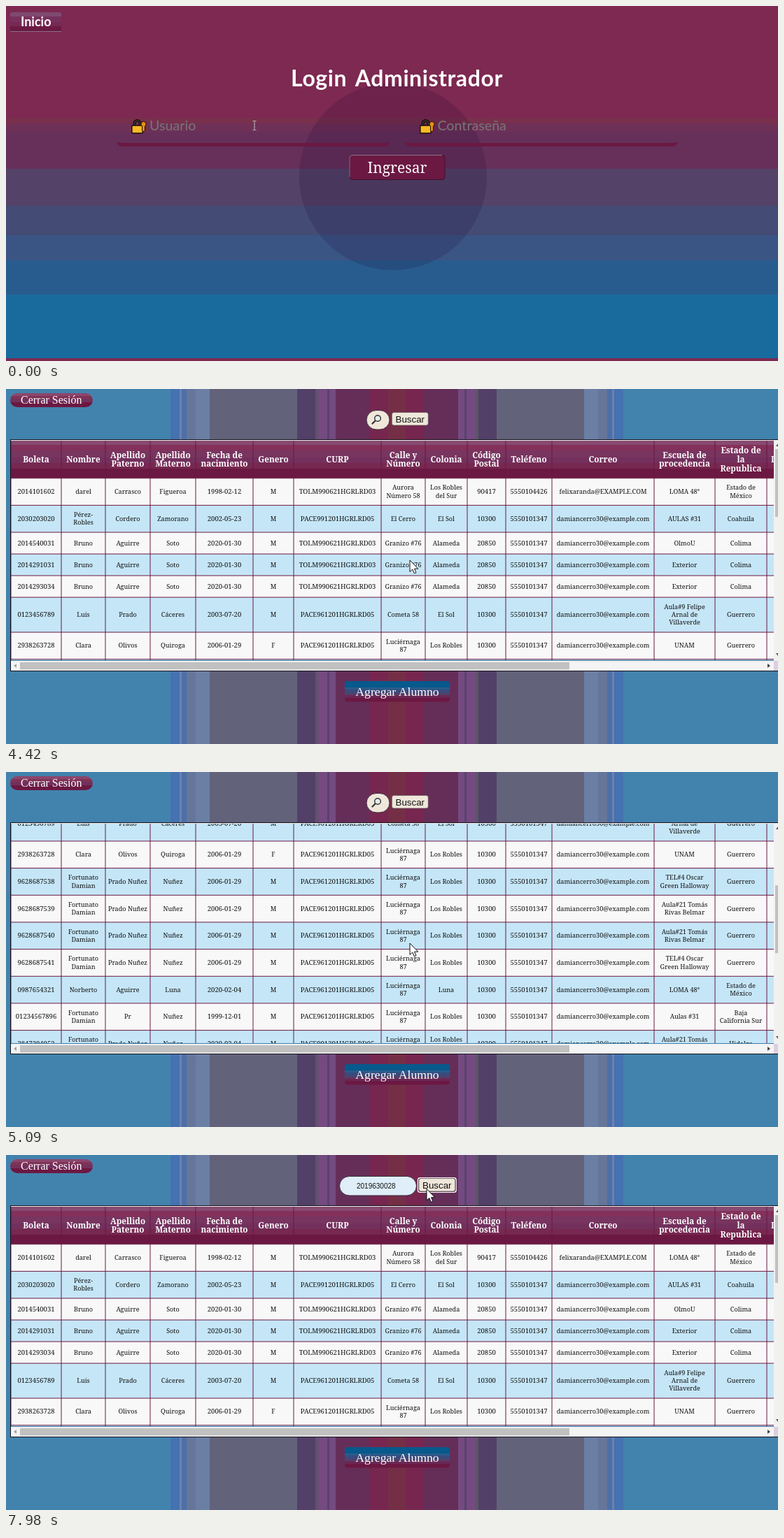
An HTML page that plays this animation: 1103x508 px, repeating every 8000 ms.

```html
<!DOCTYPE html>
<html lang="es">
<head>
<meta charset="utf-8">
<title>Login</title>
<style>
html, body { margin: 0; width: 100%; height: 100%; overflow: hidden; }
svg { display: block; width: 100vw; height: 100vh; }
text { white-space: pre; }
.mid { text-anchor: middle; }
.title { font: bold 32px Lato, sans-serif; letter-spacing: .58px; word-spacing: 4.4px; fill: #fff; }
.hint { font: 500 19.6px Lato, sans-serif; fill: #777274; }
.user { font: 500 20px Lato, sans-serif; fill: #000; }
.home { font: bold 18px Lato, sans-serif; fill: #fff; }
.enter { font: 500 21px "Noto Serif", serif; fill: #fff; }
.out { font: 16px "Liberation Serif", serif; fill: #fff; }
.add { font: 17.7px "Liberation Serif", serif; fill: #fff; }
.find { font: 13.33px "Liberation Sans", sans-serif; fill: #111; }
.query { font: 10px "Liberation Sans", sans-serif; fill: #111; }
.item { font: 600 10px "Noto Sans", sans-serif; fill: #f0f0ec; }
.head { font: bold 11.7px "Noto Serif", serif; fill: #fff; }
.cell { font: 9.1px "Noto Serif", serif; fill: #111; }
.num { font-size: 9.5px; }
</style>
</head>
<body>
<svg id="stage" viewBox="0 0 1103 508" preserveAspectRatio="none"></svg>
<script>
const LOOP = 8000;
const WINE = '#6b1842';
const CREAM = '#efe7da';

const rect = (x, y, w, h, fill, more = '') =>
  `<rect x="${x}" y="${y}" width="${w}" height="${h}" fill="${fill}" ${more}/>`;
const text = (x, y, s, cls) => `<text x="${x}" y="${y}" class="${cls}">${s}</text>`;
const path = (d, more) => `<path d="${d}" ${more}/>`;
const group = (id, body, more = '') => `<g id="${id}" ${more}>${body}</g>`;

// Vertical gradient with hard edges: pairs of start offset and colour.
const bands = (id, stops) => `<linearGradient id="${id}" x2="0" y2="1">` +
  stops.map(([at, c], i) => {
    const end = i + 1 < stops.length ? stops[i + 1][0] : 1;
    return `<stop offset="${at}" stop-color="${c}"/><stop offset="${end}" stop-color="${c}"/>`;
  }).join('') + '</linearGradient>';

const ring = (id, x, y, w, h) => group(id,
  rect(x + .75, y + .75, w - 1.5, h - 1.5, 'none', 'stroke="#fff" stroke-width="1.5" rx="3"') +
  rect(x + 2.25, y + 2.25, w - 4.5, h - 4.5, 'none', 'stroke="#141014" stroke-width="1.5" rx="2"'));

const lock = x => `<g transform="translate(${x} 162)" stroke="#181008" stroke-width="1.5">` +
  path('M4.5 10V6a4 4 0 0 1 8 0v4', 'fill="none" stroke-width="4"') +
  path('M4.5 10V6a4 4 0 0 1 8 0v4', 'fill="none" stroke="#4c4a4c" stroke-width="1"') +
  rect(.8, 9, 15.5, 11, '#fcb925', 'rx="1.5"') +
  path('M15.5 10a3.6 3.6 0 1 1 4 0v6l-2 2-2-2z', 'fill="#e88d12" stroke-width="1"') + '</g>';

/* ---------- Login page ---------- */

const stripes = [[0, '#7d2951'], [160, '#79304c'], [168, '#6f3057'], [180, '#66305b'], [233, '#544268'],
  [286, '#444b75'], [328, '#3a5484'], [364, '#295c8e'], [413, '#196b9e'], [504, '#7d2951']];
const underline = x => path(`M${x} 195q8 1 14 1h362q8 0 14-1q-2 6-9 6h-372q-7 0-9-6z`, `fill="${WINE}"`);

function dropdown(id, x, y, w, items) {
  return group(id,
    rect(x - 1, y, w + 2, 192, '#000', 'opacity=".18" rx="4"') +
    rect(x, y, w, 190, '#232921', 'rx="3"') +
    rect(x, 0, w, 29.5, '#51513f', `id="${id}Hover"`) +
    items.map((s, i) => text(x + 10, y + 25 + i * 29.5, s, 'item')).join(''));
}

const users = ['tutor', 'tutor02', 'control', 'revisor', 'consulta', 'prueba'];
const found = ['PE2948264826', 'PE87654321', '2019630028', 'PE12345678', '2019630021', '2839203330'];

const login =
  stripes.map(([y, c], i) => rect(0, y, 1103, (i < stripes.length - 1 ? stripes[i + 1][0] : 508) - y, c)).join('') +
  '<circle cx="553" cy="244" r="134" fill="#14062c" opacity=".16"/>' +
  rect(6, 9, 73, 28, 'url(#home)', 'rx="3"') + rect(6, 36, 73, 1, '#8b6f86') +
  text(21, 29, 'Inicio', 'home') +
  text(558.5, 115, 'Login Administrador', 'title mid') +
  underline(158) + underline(570) +
  group('userHint', lock(179) + text(205, 178, 'Usuario', 'hint')) +
  text(176, 178, users[0], 'user" id="userText') +
  group('passHint', lock(591) + text(616.5, 178, 'Contraseña', 'hint')) +
  group('dots', Array.from({ length: 11 }, (_, i) => `<circle cx="${594 + i * 10.7}" cy="173" r="4.3"/>`).join('')) +
  rect(491, 213.5, 136, 35, WINE, 'rx="4" stroke="#3c1230"') +
  path('M491 245V217q0-3.5 4-3.5H623', 'fill="none" stroke="#8c7488"') +
  text(559, 239, 'Ingresar', 'enter mid') +
  ring('userRing', 156, 145, 394, 58) + ring('passRing', 568, 145, 394, 58) + ring('enterRing', 488, 211, 142, 40) +
  dropdown('userList', 157, 203, 392, users);

/* ---------- Table page ---------- */

const cols = [7, 79, 142, 206, 271, 353, 411, 536, 599, 659, 714, 780, 926, 1013, 1087];
const heads = ['Boleta', 'Nombre', 'Apellido/Paterno', 'Apellido/Materno', 'Fecha de/nacimiento', 'Genero', 'CURP',
  'Calle y/Número', 'Colonia', 'Código/Postal', 'Teléfeno', 'Correo', 'Escuela de/procedencia', 'Estado de/la/Republica'];

const TEL = '5550101347';
const MAIL = `${TEL}|damiancerro30@example.com`;
const AULA = 'Aula#21 Tomás/Rivas Belmar';
const TECH = 'TEL#4 Oscar/Green Halloway';
const MAN = 'Fortunato/Damian|';
const STREET = 'Luciérnaga/87';
const CODE = 'PACE991201HGRLRD05', CODE2 = 'PACE961201HGRLRD05', CODE3 = 'TOLM990621HGRLRD03';
const bruno = (id, school) => `${id}|Bruno|Aguirre|Soto|2020-01-30|M|${CODE3}|Granizo #76|Alameda|20850|${MAIL}|${school}|Colima`;
const damian = id => `${id}|${MAN}Prado Nuñez|Nuñez|2020-02-04|M|${CODE}|${STREET}|Los Robles/del Sur|10300|${MAIL}|${AULA}|Hidalgo`;
const early = (id, school) => `${id}|${MAN}Prado Nuñez|Nuñez|2006-01-29|M|${CODE2}|${STREET}|Los Robles|10300|${MAIL}|${school}|Guerrero`;

const rows = [
  `2014101602|darel|Carrasco|Figueroa|1998-02-12|M|${CODE3}|Aurora/Número 58|Los Robles/del Sur|90417|5550104426|felixaranda@EXAMPLE.COM|LOMA 48°|Estado de/México`,
  `2030203020|Pérez-/Robles|Cordero|Zamorano|2002-05-23|M|${CODE}|El Cerro|El Sol|10300|${MAIL}|AULAS #31|Coahuila`,
  bruno('2014540031', 'OlmoU'), bruno('2014291031', 'Exterior'), bruno('2014293034', 'Exterior'),
  `0123456789|Luis|Prado|Cáceres|2003-07-20|M|${CODE2}|Cometa 58|El Sol|10300|${MAIL}|Aula#9 Felipe/Arnal de/Villaverde|Guerrero`,
  `2938263728|Clara|Olivos|Quiroga|2006-01-29|F|${CODE2}|${STREET}|Los Robles|10300|${MAIL}|UNAM|Guerrero`,
  early('9628687538', TECH), early('9628687539', AULA), early('9628687540', AULA), early('9628687541', TECH),
  `0987654321|Norberto|Aguirre|Luna|2020-02-04|M|${CODE2}|${STREET}|Luna|10300|${MAIL}|LOMA 48°|Estado de/México`,
  `01234567896|${MAN}Pr|Nuñez|1999-12-01|M|${CODE2}|${STREET}|Los Robles|10300|${MAIL}|Aulas #31|Baja/California Sur`,
  ...['3847294053', '1937462930', '2039462937', '1204939382'].map(damian),
  `3847294829|Eva|Campos|Figueroa|1995-04-10|F|CAFE950410HGRLRD01|Aurora/Número 58|Leonardo|71260|5550102285|claraNsol.4@example.com|Aula#5/Aurelio/Montes Rey|Oaxaca`,
  `2019630028|${MAN}Prado|Nuñez|1999-12-01|M|${CODE}|Fausto/Lira|Los Robles|83100|${MAIL}|LOMA 48°|Guerrero`,
  `7394947193|Luis|Pérez|Robles|1999-06-23|M|PERL990621HGRLRD03|Laguna 87|Olmeda|10300|5550108583|lperez@example.com|${TECH}|Colima`,
  ...['2839203330', '2019630021', '2948264826'].map(damian)
];

const isNum = c => [0, 4, 6, 9, 10].includes(c);
const lines = (s, x, y, step, cls) => {
  const all = s.split('/');
  return all.map((l, i) => text(x, y + (i - (all.length - 1) / 2) * step, l, cls)).join('');
};
const middle = c => (cols[c] + cols[c + 1]) / 2;

function table() {
  let out = rect(7, 74, 1090, 53.5, 'url(#head)');
  heads.forEach((h, c) => out += lines(h, middle(c), 105, 12.7, 'head mid'));
  out += text(1093, 105, 'I', 'head');
  let y = 127.7;
  rows.forEach((row, r) => {
    const cells = row.split('|');
    const n = Math.max(...cells.map(s => s.split('/').length));
    const h = [31, 38.67, 50][n - 1];
    out += rect(7, y, 1090, h, r % 2 ? '#c5e6f7' : '#f8f8f8') + rect(7, y - .5, 1090, 1, WINE);
    cells.forEach((s, c) => out += lines(s, middle(c), y + h / 2 + 3, 11.3, 'cell mid' + (isNum(c) ? ' num' : '')));
    y += h;
  });
  cols.forEach(x => out += rect(x - .5, 74, 1, y - 74, WINE));
  return out;
}

const walls = [[0, '#4283ae'], [235, '#4572b0'], [248, '#6f7fae'], [251, '#4b70a8'], [258, '#66769a'], [271, '#6b7fa5'],
  [291, '#62627a'], [416, '#534069'], [442, '#5b5668'], [446, '#744a80'], [459, '#58436f'], [462, '#744a80'],
  [471, '#652e59'], [520, '#77264f'], [546, '#742f46']];
const backdrop = walls.map(([x, c]) => rect(x, 0, 1117 - 2 * x, 508, c)).join('');

const panel =
  rect(6.5, 72.5, 1100, 331, '#f1f1f1', 'stroke="#15101a"') +
  `<g clip-path="url(#view)">${group('rows', table())}</g>` +
  rect(1097, 74, 6, 315, '#f1f1f1') + rect(1099, 0, 4, 97, '#c1c1c1', 'id="thumb"') +
  path('M1103 78l-3 4h3zM1103 382l-3-4h3z', 'fill="#555"') +
  rect(7, 388, 1090, 1, '#3f7dac') +
  rect(7, 389, 1090, 14, '#f4f4f4') + rect(20, 391, 785, 10.5, '#c1c1c1') +
  path('M15 393v6l-4-3z', 'fill="#a3a3a3"') + path('M1088 393v6l4-3z', 'fill="#444"') +
  rect(1097, 389, 6, 14, '#dccfe0');

const search =
  rect(0, 30.5, 33, 27.5, CREAM, 'id="field" rx="14" stroke="#3a2a3c"') +
  group('lens', '<circle cx="531" cy="42" r="4.3" fill="#e3eef0" stroke="#333" stroke-width="1.4"/>' +
    path('M527.5 45.5l-4 4', 'stroke="#333" stroke-width="2.2" stroke-linecap="round"')) +
  text(501, 47.5, '', 'query" id="query') + rect(501, 38, 1, 12, '#111', 'id="caret"') +
  group('find', ring('findRing', -28, 32, 56, 22) +
    rect(-26, 33.5, 52, 18.5, CREAM, 'rx="3" stroke="#5d4a55" stroke-width=".7"') + text(0, 47.7, 'Buscar', 'find mid'));

const listing = backdrop +
  rect(6, 6, 118, 20, 'url(#out)', 'rx="10"') + text(21, 21, 'Cerrar Sesión', 'out') +
  panel + search +
  rect(484, 418, 150, 29.5, 'url(#add)', 'rx="4"') + text(559, 438.5, 'Agregar Alumno', 'add mid') +
  dropdown('findList', 514, 59, 157, found);

const arrow = path('M0 0V16.5L3.8 13 6.3 18.8 9 17.7 6.5 12.2H11.8z', 'fill="#fff" stroke="#111"');
const beam = path('M-2.5-6.5H-.7L0-6 .7-6.5H2.5M-2.5 6.5H-.7L0 6 .7 6.5H2.5M0-6V6', 'fill="none" stroke="#b4a8ae" stroke-width="1.2"');
const hand = path('M-1.5 0q2-1.5 3 .5v6q2-1.5 3 .5 2-1 3 .5 2-.8 3 1.2v6l-2 5.800h-8.5l-6-8.5q1-2.5 4.5.5z',
  'fill="#fff" stroke="#111"');

document.getElementById('stage').innerHTML = '<defs>' +
  bands('home', [[0, '#7f4a70'], [.2, '#78305c'], [.5, '#752953'], [.72, '#6b1a43']]) +
  bands('out', [[0, '#8b466c'], [.2, '#803257'], [.4, '#73305c'], [.65, '#6b1842']]) +
  bands('head', [[0, '#874a70'], [.12, '#83305a'], [.27, '#78355f'], [.45, '#73305d'], [.6, '#772850'], [.74, '#6b1842']]) +
  bands('add', [[0, '#07598c'], [.3, '#295c8c'], [.42, '#3a4b7c'], [.56, '#544068'], [.68, '#6a2855'], [.8, '#6b1842']]) +
  '<clipPath id="view"><rect x="7" y="74" width="1090" height="314"/></clipPath></defs>' +
  group('login', login) + group('listing', listing) +
  group('cursor', group('arrow', arrow) + group('beam', beam) + group('hand', hand));

/* ---------- Motion ---------- */

const el = {};
document.querySelectorAll('#stage [id]').forEach(n => el[n.id] = n);
const set = (id, props) => { for (const k in props) el[id].setAttribute(k, props[k]); };
const show = (id, on) => { el[id].style.display = on ? '' : 'none'; };
const clamp = v => Math.min(1, Math.max(0, v));
const smooth = v => v * v * (3 - 2 * v);
const during = (t, a, b) => t >= a && t < b;

// Time, x, y of the pointer.
const moves = [[0, 355, 171], [400, 355, 171], [780, 330, 226], [840, 330, 226], [1010, 600, 182], [1060, 600, 182],
  [1210, 559, 269], [2600, 559, 269], [2630, 557, 265], [2900, 570, 239], [3670, 570, 239], [4300, 577, 245],
  [5290, 577, 245], [5750, 532, 46], [6120, 532, 46], [6300, 560, 82], [6640, 569, 120], [6820, 571, 140],
  [7250, 571, 142], [7780, 574, 46], [7965, 574, 46], [7980, 601, 48.5]];
const scrolls = [[4450, 0], [4860, 560], [4910, 491], [5240, 50], [5275, 0]];

function track(keys, t, ease = v => v) {
  const i = keys.findIndex(k => k[0] > t);
  if (i < 0) return keys[keys.length - 1].slice(1);
  if (!i) return keys[0].slice(1);
  const a = keys[i - 1], b = keys[i];
  const k = ease((t - a[0]) / (b[0] - a[0]));
  return a.slice(1).map((v, j) => v + (b[j + 1] - v) * k);
}

// Marks the list item under the pointer and returns its index, or -1.
function hover(id, top, y, open) {
  const i = Math.floor((y - top - 7) / 29.5);
  const on = open && i >= 0 && i < 6;
  show(id, open);
  show(id + 'Hover', on);
  if (on) set(id + 'Hover', { y: top + 7 + i * 29.5 });
  return on ? i : -1;
}

function drawLogin(t, y) {
  const picked = hover('userList', 203, y, during(t, 150, 810)) >= 0 || t >= 810;
  show('userHint', !picked);
  show('userText', picked);
  const typed = t < 1370 ? 0 : t < 1850 ? Math.min(5, 1 + Math.floor((t - 1370) / 62)) : Math.min(11, 6 + Math.floor((t - 1850) / 110));
  [...el.dots.children].forEach((d, i) => { d.style.display = i < typed ? '' : 'none'; });
  show('passHint', !typed);
  show('userRing', during(t, 30, 1040));
  show('passRing', during(t, 1040, 2910));
  show('enterRing', t >= 2910);
}

function drawListing(t, y) {
  const [top] = track(scrolls, t);
  set('rows', { transform: `translate(0 ${-top})` });
  set('thumb', { y: 86 + top * .306 });

  const pick = hover('findList', 59, y, during(t, 5900, 7260));
  const wide = smooth(clamp((t - 6150) / 250));
  const w = 33 + 77 * wide, left = 515 - 38.5 * wide;
  const query = t >= 7260 ? found[2] : pick >= 0 ? found[pick] : '';
  set('field', { x: left, width: w, fill: wide ? '#dfeef8' : CREAM });
  set('find', { transform: `translate(${left + w + 29.3})` });
  el.query.textContent = wide > .8 ? query : '';
  show('lens', !wide);
  show('caret', wide === 1 && t < 7260);
  show('findRing', t >= 7980);
}

function drawCursor(t, x, y, first) {
  const inField = first ? y > 147 && y < 203 && (x < 549 || x > 569) : t > 5300 && t < 7970 && y > 31 && y < 58;
  const inButton = first && x > 491 && x < 627 && y > 213 && y < 248;
  show('beam', inField);
  show('hand', inButton);
  show('arrow', !inField && !inButton);
  set('cursor', { transform: `translate(${x} ${y})` });
}

function draw(t) {
  const first = t < 3670;
  const [x, y] = track(moves, t, smooth);
  show('login', first);
  show('listing', !first);
  if (first) drawLogin(t, y); else drawListing(t, y);
  drawCursor(t, x, y, first);
}

const start = performance.now();
function tick() {
  draw((performance.now() - start) % LOOP);
  requestAnimationFrame(tick);
}
tick();
</script>
</body>
</html>
```
